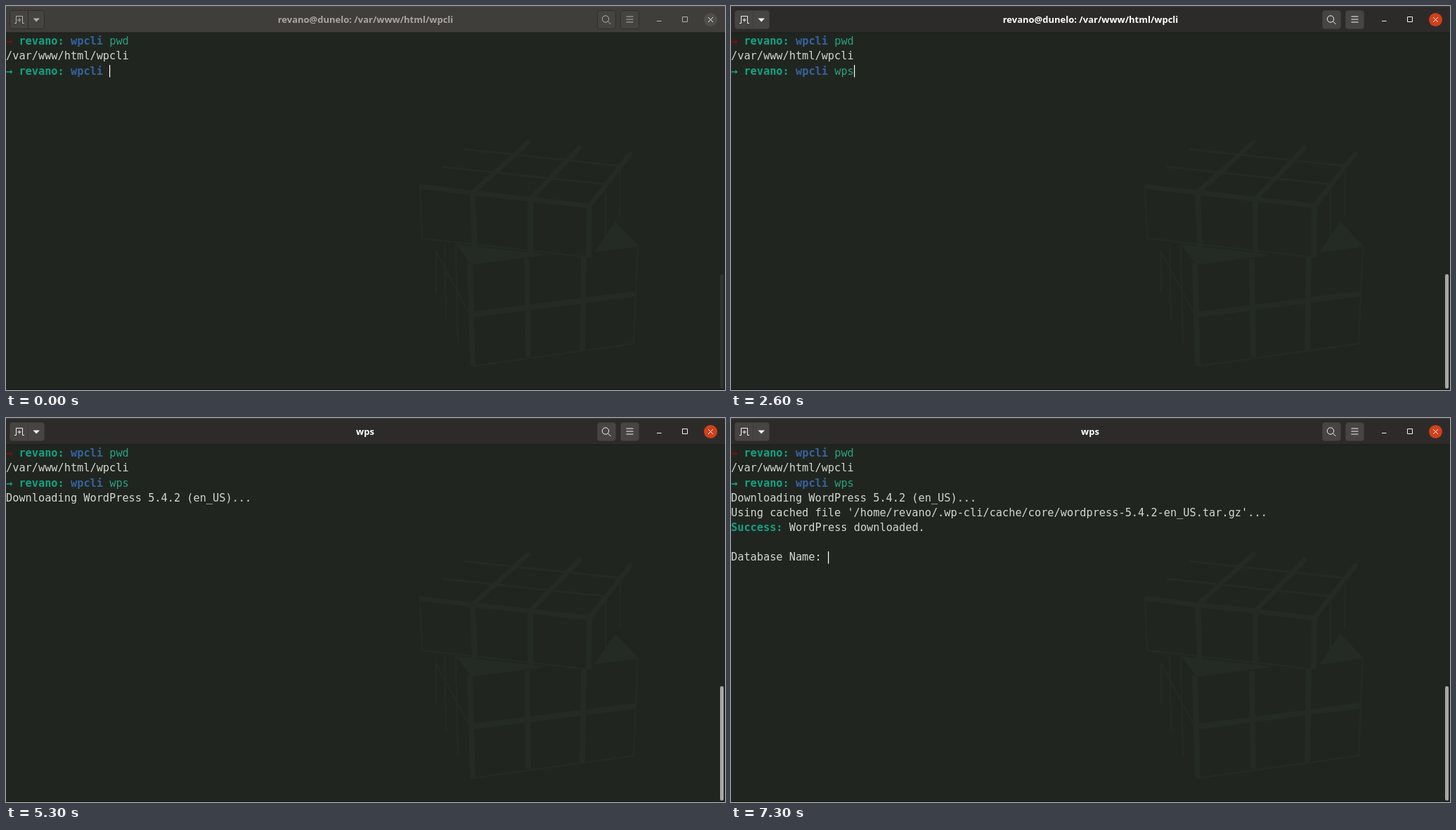
Write an HTML page that moves like this. It is 1023x547 px and loops after 8 s.

```html
<!DOCTYPE html>
<html lang="en">
<head>
<meta charset="utf-8">
<title>Terminal session</title>
<style>
  html, body { margin: 0; width: 100%; height: 100%; overflow: hidden; background: #20261f; }
  svg { display: block; width: 100%; height: 100%; }
  text { white-space: pre; }
  .term { font: 15.28px "DejaVu Sans Mono", monospace; fill: #d3d7cf; }
  .title { font: bold 13px "Noto Sans", sans-serif; text-anchor: middle; fill: var(--title); }
  .user, .dir, .arrow, .ok { font-weight: bold; }
  .user, .ok, .arrow { fill: #16a085; }
  .dir { fill: #3762a0; }
  .cmd { fill: #2aa184; }
  .failed { fill: #8c0a0a; }
  .caret { fill: #fff; }
  .icon { fill: none; stroke: var(--icon); stroke-width: 1; }
  .button { fill: var(--button); stroke: var(--edge); }
  .cube { fill: none; stroke: #242a24; }
  #window {
    --bar: #403e3b; --title: #aaa69f; --icon: #b5b2ac; --button: #464441;
    --edge: #302f2d; --close: #504e4b; --scroll: #2d332d; --rim: #4b4946;
  }
  #window.focused {
    --bar: #2d2b2a; --title: #fff; --icon: #f4f3f2; --button: #474543;
    --edge: #3d3b39; --close: #d1401a; --scroll: #a7a8a5; --rim: #3b3938;
  }
</style>
</head>
<body>
<svg id="window" viewBox="0 0 1023 547" preserveAspectRatio="none">
  <rect width="1023" height="547" fill="#20261f"/>

  <g class="cube">
    <path stroke-width="3" d="M652 204L875 228M620 229L853 254"/>
    <path stroke-width="7" d="M588 257L664 266 746 275 830 285M664 266L745 192M746 275L818 200M830 285L890 208"/>
    <path stroke-width="8" d="M664 266L667 343M746 275V353M830 285L829 358"/>
    <path stroke-width="2" d="M589 257L592 331 829 358M853 254V330M874 228L873 300"/>
    <path stroke-width="8" d="M660 366L664 513M741 360L743 500M822 358L820 490M660 440L895 410"/>
    <path stroke-width="2" d="M660 368L760 355M838 350L899 342 893 481 664 513M611 348L660 440"/>
    <path stroke-width="2" d="M612 350V408M624 338L626 445M640 340L643 480"/>
    <path stroke="none" fill="#242a24" d="M838 350L867 307 900 342zM640 339L662 368 770 354 668 343z"/>
  </g>

  <rect width="1023" height="38" fill="var(--bar)"/>
  <rect width="1023" height="1.5" fill="var(--rim)"/>
  <rect y="37.5" width="1023" height="1" fill="#1b1d19"/>
  <g class="button">
    <rect x="5.5" y="6.5" width="49" height="26" rx="3.5"/>
    <path d="M31.5 7V32"/>
    <rect x="841.5" y="6.5" width="26" height="26" rx="3.5"/>
    <rect x="874.5" y="6.5" width="26" height="26" rx="3.5"/>
  </g>
  <circle cx="1002.5" cy="19.5" r="9.5" fill="var(--close)"/>
  <g class="icon">
    <path d="M12 24.5H14.5V14.5H23.5V24.5H26M19 17.5V22.5M16.5 20H21.5"/>
    <path fill="var(--icon)" stroke="none" d="M38.5 17.5H48L43.2 22.5z"/>
    <circle cx="853" cy="18.5" r="4.7"/>
    <path d="M856.5 22L860.5 26M882.5 15H892.5M882.5 19H892.5M882.5 23H892.5"/>
    <path d="M926 21.5H932.5M962.5 15.5H969.5V22.5H962.5z"/>
    <path stroke="#f4f3f2" d="M999 16L1006 23M1006 16L999 23"/>
  </g>
  <text class="title" x="511.5" y="24" data-on="0-3800">revano@dunelo: /var/www/html/wpcli</text>
  <text class="title" x="511" y="24" data-on="3800-8000">wps</text>

  <rect x="1016" y="382" width="5" height="163" rx="2.5" fill="var(--scroll)"/>
  <rect y="546" width="1023" height="1" fill="#181b17"/>

  <g class="term" id="screen"></g>

  <g id="pointer">
    <path id="beam" fill="#111" stroke="#fff"
      d="M-3.5 -7.5H3.5V-5.5H1.5V5.5H3.5V7.5H-3.5V5.5H-1.5V-5.5H-3.5z"/>
    <path id="arrowhead" fill="#111" stroke="#fff" d="M0 0V15L3.5 11.8 6 17 8.3 16 6 11H10.5z"/>
  </g>
</svg>

<script>
const LOOP = 8000, COLUMN = 9.2, ROW = 21.12, BASELINE = 55.3;
const win = document.getElementById("window");
const terminal = document.getElementById("screen");
const pointer = document.getElementById("pointer");
const beam = document.getElementById("beam");
const arrowhead = document.getElementById("arrowhead");

function add(tag, attributes, content = "") {
  const node = document.createElementNS("http://www.w3.org/2000/svg", tag);
  for (const [name, value] of Object.entries(attributes)) node.setAttribute(name, value);
  node.textContent = content;
  return terminal.appendChild(node);
}

function write(row, column, content, style = "", on = "0-8000") {
  add("text", { x: column * COLUMN, y: BASELINE + row * ROW, class: style, "data-on": on }, content);
}

function caret(row, column, on) {
  add("rect", {
    x: Math.round(column * COLUMN), y: Math.round(41.7 + row * ROW),
    width: 1.2, height: 17.5, class: "caret", "data-on": on
  });
}

function prompt(row, arrowStyle) {
  write(row, 0, "→", arrowStyle);
  write(row, 2, "revano:", "user");
  write(row, 10, "wpcli", "dir");
}

prompt(0, "arrow failed");
write(0, 16, "pwd", "cmd");
write(1, 0, "/var/www/html/wpcli");
prompt(2, "arrow");
write(2, 16, "w", "cmd", "2100-8000");
write(2, 17, "ps", "cmd", "2600-8000");
write(3, 0, "Downloading WordPress 5.4.2 (en_US)...", "", "5300-8000");
write(4, 0, "Using cached file '/home/revano/.wp-cli/cache/core/wordpress-5.4.2-en_US.tar.gz'...", "", "5400-8000");
write(5, 0, "Success:", "ok", "6100-8000");
write(5, 9, "WordPress downloaded.", "", "6100-8000");
write(7, 0, "Database Name:", "", "6100-8000");

caret(2, 16, "0-1600");
caret(2, 17, "2100-2600");
caret(2, 19, "2600-3100 3600-3800");
caret(3, 0, "3800-4200");
caret(7, 15, "6100-6700 7300-8000");

const timed = [...document.querySelectorAll("[data-on]")].map(node => ({
  node, spans: node.dataset.on.split(" ").map(span => span.split("-").map(Number))
}));

// The mouse is sampled every 100 ms from its entry at 500 ms.
const mousePath = [[121, 6], [205, 125], [240, 189], [237, 180]];

function setVisible(node, visible) {
  node.style.display = visible ? "" : "none";
}

function render(time) {
  for (const { node, spans } of timed)
    setVisible(node, spans.some(([from, to]) => time >= from && time < to));
  win.classList.toggle("focused", time >= 1100);

  const mouseShown = time >= 500 && time < 2100;
  setVisible(pointer, mouseShown);
  if (mouseShown) {
    const [x, y] = mousePath[Math.min(3, Math.floor((time - 500) / 100))];
    pointer.setAttribute("transform", `translate(${x} ${y})`);
    setVisible(beam, y > 38);
    setVisible(arrowhead, y <= 38);
  }
}

const start = performance.now();
function tick() {
  render((performance.now() - start) % LOOP);
  requestAnimationFrame(tick);
}
tick();
</script>
</body>
</html>
```
